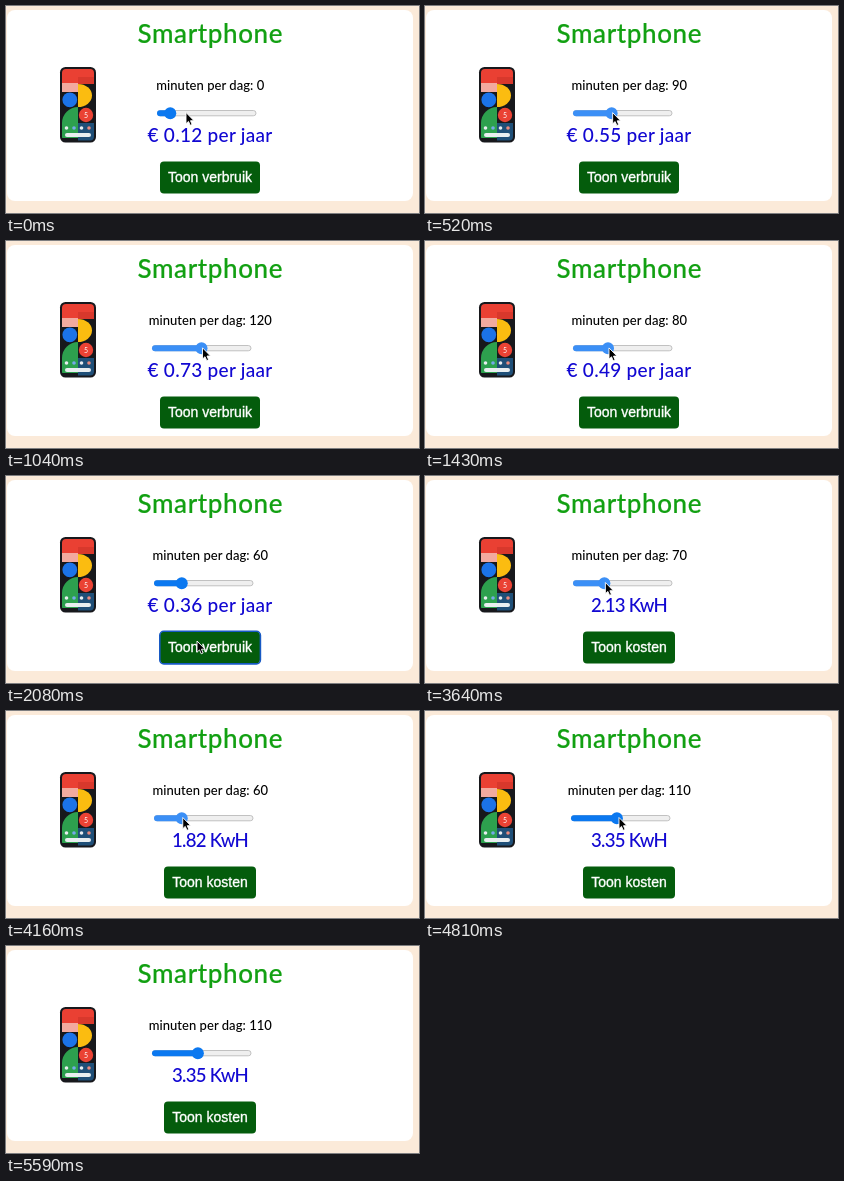
An HTML page for the animation above (5720 ms loop, 413 px wide and 207 px high).

```html
<!DOCTYPE html>
<html lang="nl">
<head>
<meta charset="utf-8">
<title>Smartphone</title>
<style>
  html, body { margin: 0; width: 100%; height: 100%; overflow: hidden; background: #fbead9; }
  svg { display: block; width: 413px; height: 207px; }
  text { font-family: Lato, "Open Sans", sans-serif; text-anchor: middle; }
  #title { font-size: 26px; font-weight: 500; letter-spacing: .6px; fill: #12a012; stroke: #12a012; stroke-width: .2; }
  #label { font-size: 13px; font-weight: 500; letter-spacing: .05px; fill: #000; }
  #result { font-size: 19px; font-weight: 500; letter-spacing: .28px; fill: #1208d2; }
  #result.energy { font-size: 18.6px; letter-spacing: -.75px; }
  #caption { font: 14px "Liberation Sans", Arial, sans-serif; fill: #fff; stroke: #fff; stroke-width: .35; }
  #button { fill: #045c0c; }
  #ring { fill: none; stroke: #1759c4; stroke-width: 1.6; }
  #fill, #thumb { fill: #0b78f0; }
  .drag #fill, .drag #thumb { fill: #3b8ff6; }
</style>
</head>
<body>
<svg viewBox="0 0 413 207">
  <rect x="1" y="4" width="406" height="191" rx="8" fill="#fff"/>
  <text id="title" x="204.3" y="37">Smartphone</text>

  <g id="phone">
    <clipPath id="screen"><rect x="56" y="63" width="32" height="71.5" rx="4"/></clipPath>
    <rect x="54" y="61" width="36" height="75.5" rx="5.5" fill="#17181c"/>
    <g clip-path="url(#screen)">
      <rect x="56" y="63" width="32" height="15" fill="#ea4033"/>
      <rect x="56" y="77" width="16" height="9" fill="#f2aa9f"/>
      <rect x="72" y="71" width="16" height="7" fill="#d8382c"/>
      <path d="M72 78A14 11.5 0 0 1 72 101Z" fill="#fbbc10"/>
      <circle cx="63.8" cy="93.8" r="7.4" fill="#1b73e8"/>
      <path d="M72 101V132H56V117A16 16 0 0 1 72 101Z" fill="#2da04e"/>
      <circle cx="80" cy="109" r="7.2" fill="#ea4234"/>
      <rect x="72" y="117" width="16" height="18" fill="#1f4f78"/>
      <rect x="59" y="127" width="26" height="4" rx="2" fill="#e9eef0"/>
    </g>
    <circle cx="60.5" cy="122" r="1.8" fill="#e8edf0"/>
    <circle cx="68" cy="122" r="1.8" fill="#76a9ea"/>
    <circle cx="75.5" cy="122" r="1.8" fill="#e8edf0"/>
    <circle cx="83" cy="122" r="1.8" fill="#e98a7e"/>
    <text x="80" y="111.5" font-size="7" fill="#fff">5</text>
  </g>

  <text id="label" x="204.3" y="84"></text>
  <g id="slider">
    <rect x=".5" y="104.5" width="98.5" height="5.3" rx="2.65" fill="#efefef" stroke="#b4b4b4" stroke-width=".8"/>
    <rect id="fill" y="104.2" height="6" rx="3"/>
    <circle id="thumb" cy="107.2" r="6"/>
  </g>
  <text id="result" x="204" y="135.5"></text>

  <rect id="button" y="155.5" height="32" rx="4"/>
  <rect id="ring" x="153.8" y="155.3" width="100.6" height="32.6" rx="4"/>
  <text id="caption" x="204" y="176"></text>

  <path id="cursor" d="M0 0V11.2L2.5 8.9L4.2 12.8L6.1 12L4.5 8.2H8Z" fill="#000" stroke="#fff" stroke-width=".9" stroke-linejoin="round"/>
</svg>
<script>
const LOOP = 5720, STEP = 130;
const el = id => document.getElementById(id);
const set = (id, attrs) => {
  for (const name in attrs) el(id).setAttribute(name, attrs[name]);
};
const show = (id, on) => set(id, { visibility: on ? 'visible' : 'hidden' });
const within = (t, from, to) => t >= from && t < to;

// [time, minutes]
const minutes = [[0, 20], [130, 40], [780, 120], [1040, 120], [1560, 60], [2730, 60],
  [2860, 70], [3250, 120], [3640, 70], [3900, 50], [4030, 50], [4160, 60], [4420, 110]];
// [time, x, y]; while dragging, x follows the thumb
const pointer = [[0, 180, 106.5], [1690, 176, 107], [1950, 191, 165], [2340, 191, 165],
  [2600, 178, 105], [2860, 181, 103.5], [3640, 179, 106.5], [4810, 194, 106.5],
  [5330, 194, 106.5], [5460, 200, 172]];

function sample(keys, t, i) {
  const n = keys.findIndex(k => k[0] > t);
  if (n < 0) return keys[keys.length - 1][i];
  const a = keys[n - 1], b = keys[n];
  return a[i] + (b[i] - a[i]) * (t - a[0]) / (b[0] - a[0]);
}

function draw(t) {
  const value = Math.round(sample(minutes, t, 1) / 10) * 10;
  const shown = t ? value : 0;
  const drag = within(t, 130, 1690) || within(t, 2730, 4810);
  const energy = t >= 2210;
  const kwh = value * 365 / 12000;
  const left = [151, 148, 146][String(shown).length - 1];
  const thumb = 6 + value / 240 * 87;
  const width = energy ? 92 : 100;

  el('label').textContent = `minuten per dag: ${shown}`;
  el('result').textContent = energy ? `${kwh.toFixed(2)} KwH` : `€ ${(kwh * .2 - 1e-9).toFixed(2)} per jaar`;
  set('result', { class: energy ? 'energy' : '' });

  set('slider', { transform: `translate(${left})`, class: drag ? 'drag' : '' });
  set('fill', { width: thumb });
  set('thumb', { cx: thumb });

  el('caption').textContent = energy ? 'Toon kosten' : 'Toon verbruik';
  set('button', { x: 204 - width / 2, width });
  set('ring', { x: 203.8 - width / 2, width: width + .6 });
  show('ring', within(t, 1950, 2730));

  const x = drag ? left + thumb + 1 : sample(pointer, t, 1);
  set('cursor', { transform: `translate(${x} ${sample(pointer, t, 2)})` });
  show('cursor', t < 5590);
}

const start = performance.now();
function tick() {
  const t = (performance.now() - start) % LOOP;
  draw(Math.floor(t / STEP) * STEP);
  requestAnimationFrame(tick);
}
tick();
</script>
</body>
</html>
```
